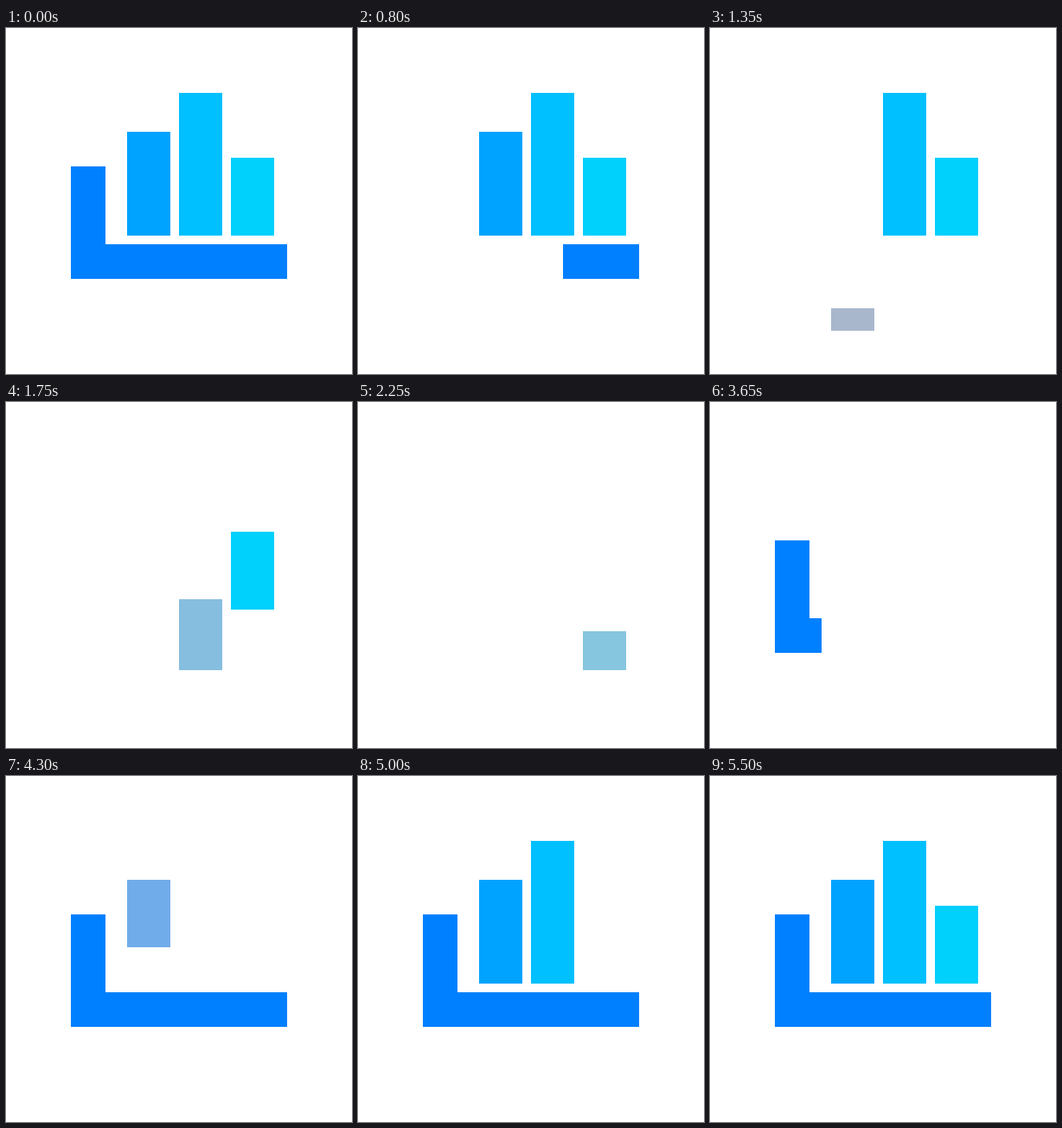
Recreate the animation shown at these times as an HTML page with a canvas. Size 400 px wide and 400 px high, loop 5550 ms.

```html
<!DOCTYPE html>
<html lang="en">
<head>
<meta charset="utf-8">
<title>Bar chart loop</title>
<style>
html, body { margin: 0; width: 100%; height: 100%; overflow: hidden; background: #fff; }
canvas { display: block; }
</style>
</head>
<body>
<canvas id="stage" width="400" height="400"></canvas>
<script>
const ctx = document.getElementById('stage').getContext('2d');
const LOOP = 5550, STEP = 50, MOVE = 400;
const BASE = 240, FLOOR = 380;
const AXIS = [0, 128, 255], GREY = [190, 188, 188];

const bars = [
  { x: 140, top: 120, color: [0, 163, 255], leave: 1050, enter: 4050 },
  { x: 200, top: 75, color: [0, 192, 255], leave: 1550, enter: 4550 },
  { x: 260, top: 150, color: [0, 208, 252], leave: 2050, enter: 5100 }
];

// Gently eased progress of a move that begins at start
function progress(t, start) {
  const u = Math.min(1, Math.max(0, (t - start) / MOVE));
  return u - 0.033 * Math.sin(2 * Math.PI * u);
}

const lerp = (a, b, p) => a + (b - a) * p;

// Blend in squared channel values, which keeps the brightness even
const mix = (a, b, p) => a.map((v, i) => Math.sqrt(lerp(v * v, b[i] * b[i], p)));

function box(left, top, right, bottom, color) {
  const [l, t, r, b] = [left, top, right, bottom].map(Math.round);
  if (r <= l || b <= t) return;
  ctx.fillStyle = `rgb(${color.map(Math.round).join()})`;
  ctx.fillRect(l, t, r - l, b - t);
}

// Edges of an axis arm: the near end leaves first, then the far end grows back
function arm(t, near, far, leave, enter) {
  return t < enter
    ? [lerp(near, far, progress(t, leave)), far]
    : [near, lerp(near, far, progress(t, enter))];
}

function drawBar(t, { x, top, color, leave, enter }) {
  if (t < enter) {
    const p = progress(t, leave);
    box(x, lerp(top, FLOOR, p), x + 50, lerp(BASE, FLOOR, p), mix(color, GREY, p));
  } else {
    const p = progress(t, enter);
    box(x, top, x + 50, lerp(top, BASE, p), mix(GREY, color, p));
  }
}

function draw(t) {
  ctx.fillStyle = '#fff';
  ctx.fillRect(0, 0, 400, 400);
  const [top, bottom] = arm(t, 160, 290, 0, 3050);
  const [left, right] = arm(t, 75, 325, 550, 3550);
  box(75, top, 115, bottom, AXIS);
  box(left, 250, right, 290, AXIS);
  bars.forEach(bar => drawBar(t, bar));
}

const begin = performance.now();
function tick() {
  const t = (performance.now() - begin) % LOOP;
  draw(Math.floor(t / STEP) * STEP);
  requestAnimationFrame(tick);
}
tick();
</script>
</body>
</html>
```
